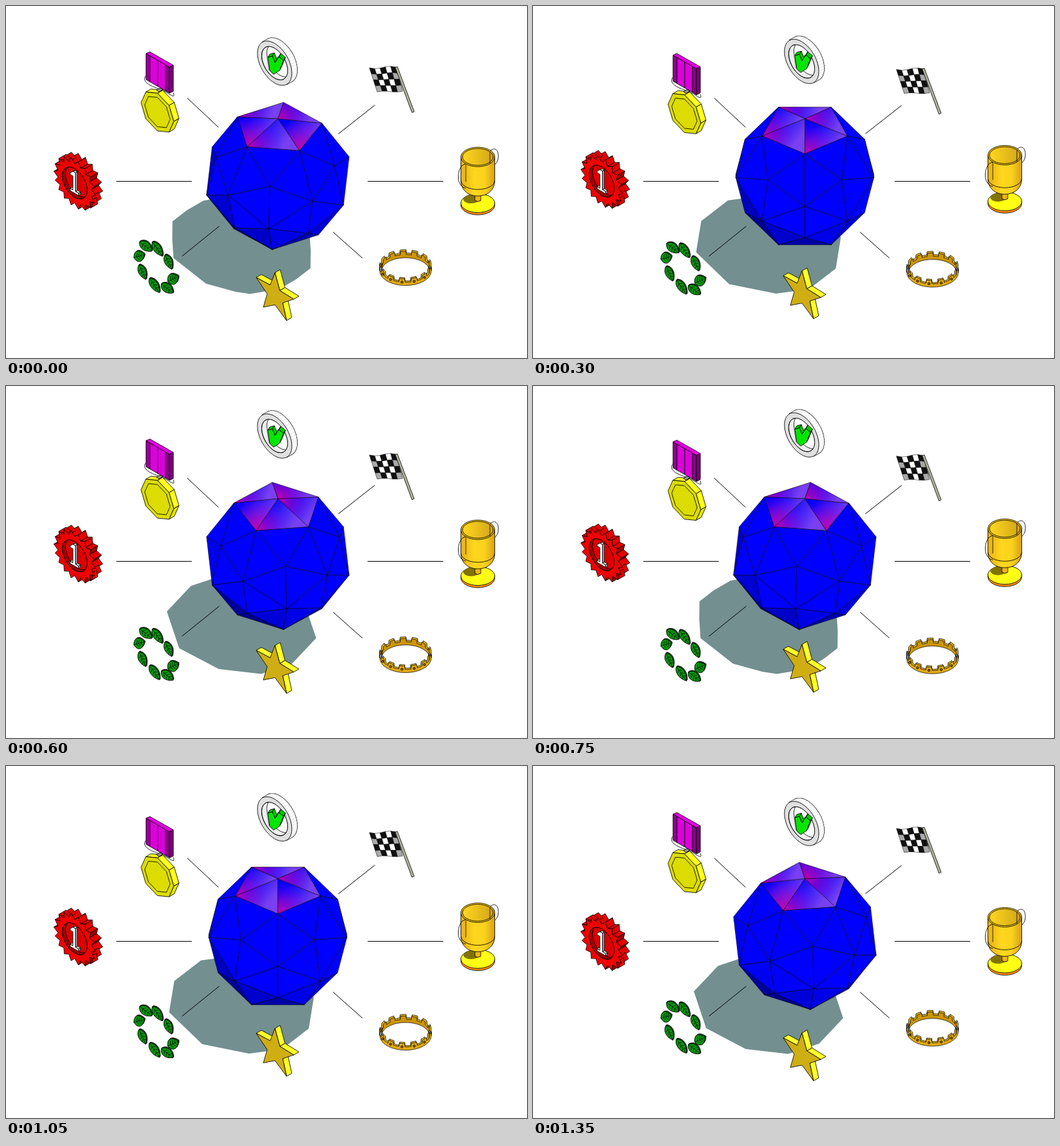
Animation, 800 px wide and 541 px high, one loop 1.5 s. Source, as an HTML page with a canvas:

```html
<!DOCTYPE html>
<html lang="en">
<head>
<meta charset="utf-8">
<title>Awards around a gem</title>
<style>
  html, body { margin: 0; width: 100%; height: 100%; overflow: hidden; background: #fff; }
  canvas, svg { position: absolute; left: 0; top: 0; width: 800px; height: 541px; }
  svg { stroke: #000; stroke-width: .85; stroke-linejoin: round; fill: none; }
</style>
</head>
<body>
<canvas id="gem" width="800" height="541"></canvas>
<svg id="icons" viewBox="0 0 800 541"></svg>
<script>
const STEP = 150, STEPS = 10;
const RISE = [0, -.6, -2.7, -6.8, -11, -12.7, -11, -6.5, -1.6, .5];
const SINK = [0, .6, 2.5, 6.9, 11, 12.7, 11, 7.2, 2.4, 1];
const rad = deg => deg * Math.PI / 180;
const range = n => Array.from({ length: n }, (_, i) => i);

// ---- Gem: a pentakis dodecahedron seen isometrically ----
const R = 113.5, CX = 417.4, CY = 261.2;
const SIN = Math.sqrt(1 / 3), COS = Math.sqrt(2 / 3);
const SUN = [.194, .557, .808], VIEW = [0, COS, SIN];
const SLANT = [-.24, -.69];   // shadow shift per unit of height
const ctx = document.getElementById('gem').getContext('2d');

const dot = (a, b) => a[0] * b[0] + a[1] * b[1] + a[2] * b[2];
const sub = (a, b) => a.map((v, i) => v - b[i]);
const cross = (a, b) => [
  a[1] * b[2] - a[2] * b[1], a[2] * b[0] - a[0] * b[2], a[0] * b[1] - a[1] * b[0]
];
const unit = a => a.map(v => v / Math.hypot(...a));
const circle = (r, z, start) => range(5).map(k => {
  const a = rad(start + 72 * k);
  return [r * Math.sin(a), r * Math.cos(a), z];
});

const corners = [
  ...circle(.607 * R, .795 * R, 0), ...circle(.982 * R, .1876 * R, 0),
  ...circle(.982 * R, -.1876 * R, 36), ...circle(.607 * R, -.795 * R, 36)
];
const P = .95 * R, PR = P * .8944, PZ = P * .4472;
const peaks = [[0, 0, P], ...circle(PR, PZ, 36), ...circle(PR, -PZ, 0), [0, 0, -P]];
const gap = (a, b) => Math.hypot(...sub(a, b));

const faces = [];
peaks.forEach((peak, i) => {
  const rim = [...corners].sort((a, b) => gap(a, peak) - gap(b, peak)).slice(0, 5);
  rim.forEach((a, j) => rim.slice(j + 1).forEach(b => {
    if (gap(a, b) > .75 * R) return;
    const n = cross(sub(a, peak), sub(b, peak));
    faces.push({ top: i === 0, pts: dot(n, peak) > 0 ? [peak, a, b] : [peak, b, a] });
  }));
});

function turn([x, f, z], a) {
  const c = Math.cos(a), s = Math.sin(a);
  return [x * c + f * s, f * c - x * s, z];
}
const project = ([x, f, z]) => [CX + x, CY + f * SIN - z * COS];
const cast = ([x, f, z]) => [361.6 + x + SLANT[0] * z, 367 + (f + SLANT[1] * z) * SIN];

function trace(pts) {
  pts.forEach((p, i) => i ? ctx.lineTo(...p) : ctx.moveTo(...p));
  ctx.closePath();
}

function paintTop(pts) {
  const xs = pts.map(p => p[0]), ys = pts.map(p => p[1]);
  const sheen = ctx.createLinearGradient(
    Math.min(...xs), Math.min(...ys), Math.max(...xs), Math.max(...ys));
  sheen.addColorStop(.2, '#0000ff');
  sheen.addColorStop(.75, '#7840f0');
  ctx.fillStyle = sheen;
  ctx.fill();
  const [x, y] = pts.reduce((a, b) => a[0] - a[1] <= b[0] - b[1] ? a : b);
  const glow = ctx.createRadialGradient(x, y, 0, x, y, 50);
  glow.addColorStop(0, 'rgba(200,0,165,1)');
  glow.addColorStop(1, 'rgba(150,0,220,0)');
  ctx.fillStyle = glow;
  ctx.fill();
}

function drawGem(angle) {
  ctx.clearRect(0, 0, 800, 541);
  const turned = faces.map(({ top, pts }) => {
    const p = pts.map(v => turn(v, angle));
    return { top, p, n: unit(cross(sub(p[1], p[0]), sub(p[2], p[0]))) };
  });

  ctx.beginPath();
  turned.filter(t => dot(t.n, SUN) > 0).forEach(t => trace(t.p.map(cast)));
  ctx.fillStyle = '#738f8f';
  ctx.fill();

  // Shared edges are stroked from both sides, so each stroke stays thin.
  ctx.strokeStyle = '#000';
  ctx.lineWidth = .55;
  ctx.lineJoin = 'round';
  for (const { top, p, n } of turned) {
    if (dot(n, VIEW) <= 0) continue;
    const flat = p.map(project);
    ctx.beginPath();
    trace(flat);
    if (top) {
      paintTop(flat);
    } else {
      const light = Math.max(.55, Math.min(1, .82 + .95 * dot(n, SUN)));
      ctx.fillStyle = `rgb(0,0,${Math.round(255 * light)})`;
      ctx.fill();
    }
    ctx.stroke();
  }
}

// ---- Icon helpers ----
const DEPTH = [8, -4.6];
const list = pts => pts.map(p => p.map(v => v.toFixed(1)).join()).join(' ');
const poly = (pts, fill, more = '') => `<polygon points="${list(pts)}" fill="${fill}" ${more}/>`;
const path = (d, fill = 'none', more = '') => `<path d="${d}" fill="${fill}" ${more}/>`;
const oval = (x, y, rx, ry, fill = 'none', more = '') =>
  `<ellipse cx="${x}" cy="${y}" rx="${rx}" ry="${ry}" fill="${fill}" ${more}/>`;
const shift = (pts, [x, y]) => pts.map(p => [p[0] + x, p[1] + y]);
const iso = (cx, cy, pts) => pts.map(([x, y]) => [cx + x * .866, cy + y + x * .5]);
const wheel = (n, radius, start = 0) => range(n).map(k => {
  const a = rad(start + 360 * k / n), r = radius(k);
  return [r * Math.cos(a), r * Math.sin(a)];
});

// Extrudes a clockwise outline and returns its sides followed by its front.
function prism(pts, front, lit, dark, depth = DEPTH, smooth = false) {
  const sides = pts.map((a, i) => {
    const b = pts[(i + 1) % pts.length];
    return { a, b, nx: b[1] - a[1], ny: a[0] - b[0],
      far: (a[0] + b[0]) * depth[0] + (a[1] + b[1]) * depth[1] };
  }).filter(s => s.nx * depth[0] + s.ny * depth[1] > 0).sort((s, t) => t.far - s.far);
  const quads = more => sides.map(({ a, b, ny }) =>
    poly([a, b, ...shift([b, a], depth)], ny < 0 ? lit : dark, more)).join('');
  return (smooth ? quads('stroke-width="1.7"') + quads(`stroke="${lit}" stroke-width=".4"`) : quads(''))
    + poly(pts, front);
}

let clips = 0;
function hollow(cx, cy, r, depth, wall, floor) {
  const rim = iso(cx, cy, wheel(40, () => r)), id = 'hole' + clips++;
  return `<clipPath id="${id}">${poly(rim, '#000')}</clipPath>` + poly(rim, wall)
    + `<g clip-path="url(#${id})">${poly(shift(rim, depth), floor)}</g>` + poly(rim, 'none');
}

// ---- Icons ----
function tick() {
  const v = [[402, 79], [409, 77], [413, 87], [419, 78], [426, 84], [420, 99], [411, 105], [405, 99]];
  return prism(iso(412.5, 87.9, wheel(48, () => 30.5)), '#e0e0e0', '#fff', '#fff', DEPTH, true)
    + hollow(412.5, 87.9, 23, DEPTH, '#f0f0f0', '#fff')
    + poly(shift(v, [-2, -1]), '#a0a0a0', 'stroke="none"')
    + prism(v, '#00e600', '#00c800', '#009600', [3, -5]);
}

function medal() {
  const slab = (x0, x1, fill) => {
    const y = x => 73 + (x - 215) * .58;
    return poly([[x0, y(x0)], [x1, y(x1)], [x1, y(x1) + 40], [x0, y(x0) + 40]], fill);
  };
  return path('M216 106C208 113 215 121 234 127C250 132 261 146 257 133')
    + slab(215, 221, '#960096') + slab(221, 233, '#dc00dc') + slab(233, 245, '#dc00dc')
    + slab(245, 251, '#8c008c')
    + poly([[215, 73], [221, 70.5], [257, 91], [251, 94]], '#e600e6')
    + poly([[251, 94], [257, 91], [257, 131], [251, 134]], '#780078')
    + prism(iso(232.5, 163, wheel(8, () => 29)), '#dcdc00', '#ffff1e', '#e6e600')
    + poly(iso(232.5, 163, wheel(8, () => 22.5)), 'none')
    + poly([[231, 129], [237, 126], [241, 128], [235, 132]], '#999');
}

function badge() {
  const one = [[-2.5, -16], [2, -16], [2, 12.5], [7.5, 12.5], [7.5, 16], [-7.5, 16], [-7.5, 12.5],
    [-2.5, 12.5], [-2.5, -9], [-7.5, -9], [-7.5, -11.5]];
  return prism(iso(105.5, 272.5, wheel(36, k => k % 2 ? 30 : 37)), '#f00000', '#e60000', '#a00000', [11, -6.4])
    + hollow(105.5, 272, 22, [5, -3], '#a00000', '#dc0000')
    + prism(iso(105, 271.5, one), '#fff', '#ddd', '#aaa', [3, -1.7]);
}

function star() {
  return prism(iso(413, 444.8, wheel(10, k => k % 2 ? 14.5 : 35, -90)), '#cfae14', '#ffff28', '#8c7800');
}

function leaf([x, y, angle, length, width]) {
  const l = length / 2, w = width * .58;
  const shape = `M${-l} 0C${-l * .6} ${-w} ${l * .3} ${-w} ${l} 0C${l * .3} ${w} ${-l * .6} ${w} ${-l} 0Z`;
  const veins = [-.5, -.1, .3].map(k =>
    `M${k * l} 0L${k * l + 3} ${-w * .5}M${k * l} 0L${k * l + 3} ${w * .5}`).join('');
  const at = (dx, dy) => `transform="translate(${x + dx} ${y + dy}) rotate(${angle})"`;
  return path(shape, '#005a00', at(.7, -.7))
    + path(shape, '#0a960f', at(-.5, .5))
    + path(`M${-l} 0H${l}` + veins, 'none', at(-.5, .5) + ' stroke-width=".6"');
}
const wreath = () => [
  [215, 369, 38, 24, 15], [233, 373, 55, 27, 13], [250, 393, 65, 25, 13], [257, 419, -25, 18, 19],
  [248, 433.5, 38, 23, 15], [228.5, 429, 55, 27, 13], [210, 408.5, 65, 25, 13], [205, 384, -15, 17, 19]
].map(leaf).join('');

function flag() {
  const at = (u, v) => [558 + 41 * u + (12 - 2 * u) * v,
    95 + 37 * v - u + 1.6 * Math.sin(2 * Math.PI * u) * (1 - 1.6 * v)];
  let cells = '';
  for (let r = 0; r < 4; r++) for (let c = 0; c < 5; c++) {
    const light = c === 0 || c === 4 ? '#aaa' : '#fff';
    cells += poly([at(c / 5, r / 4), at((c + 1) / 5, r / 4), at((c + 1) / 5, (r + 1) / 4), at(c / 5, (r + 1) / 4)],
      (r + c) % 2 ? light : '#111', 'stroke-width=".5"');
  }
  return cells + poly([[597.5, 94.3], [601, 93.3], [626.8, 162.3], [623.3, 163.8]], '#b4b4a0', 'stroke-width=".8"');
}

function trophy() {
  const x = 724.5;
  return `<linearGradient id="gold"><stop stop-color="#e6af14"/><stop offset=".4" stop-color="#ffd71e"/>
    <stop offset=".7" stop-color="#fad21e"/><stop offset="1" stop-color="#d7a014"/></linearGradient>
    <linearGradient id="inside"><stop stop-color="#ffd71e"/><stop offset="1" stop-color="#d2a519"/></linearGradient>`
    + path('M698.5 302V306A26 15 0 0 0 750.5 306V302Z', '#ff8c0a')
    + oval(x, 303, 26, 14.5, '#ffff14')
    + path('M702 297C706 290 716 289 724 290V301C716 305 704 304 702 297Z', '#827300', 'stroke="none"')
    + path('M720 288V299Q724.5 302 729 299V288Z', '#f0b414')
    + path('M743 223C749 217 756 219 756 231C756 241 750 245 743 249')
    + path('M698.5 232V268C698.5 284 711 292 724.5 292S750.5 284 750.5 268V232Z', 'url(#gold)')
    + oval(x, 232, 26, 15, 'url(#gold)')
    + oval(x, 232, 23.5, 13, 'url(#inside)')
    + path('M698.5 268A26 14 0 0 0 750.5 268')
    + path('M706 244V270M743 224V242', 'none', 'stroke-width=".8"')
    + path('M706 243C698 243 694.5 254 694.5 263C694.5 273 700 279 706 280');
}

function crown() {
  const cx = 613.5, cy = 407, teeth = 13;
  const wall = (from, to, rx, ry, fill) => {
    const at = (deg, h) => [cx + rx * Math.cos(rad(deg)), cy + ry * Math.sin(rad(deg)) - h];
    const top = [], base = [];
    for (let d = from; d <= to; d += 1) {
      const phase = ((d - 8) * teeth / 360 % 1 + 1) % 1;
      top.push(at(d, phase < .5 ? 10 : 5));
      base.unshift(at(d, 0));
    }
    return poly([...top, ...base], fill, 'stroke-width=".8"');
  };
  const studs = range(5).map(k => {
    const a = rad(8 + (k + 1.25) * 360 / teeth);
    return oval((cx + 39.5 * Math.cos(a)).toFixed(1), (cy + 22.5 * Math.sin(a) - 5).toFixed(1), 1.7, 1.7, '#a06e00');
  }).join('');
  return wall(180, 360, 39.5, 22.5, '#e6b41e') + wall(180, 360, 36.5, 20, '#cd960a')
    + wall(0, 180, 36.5, 20.5, '#e6b41e') + wall(0, 180, 39.5, 22.5, '#e1aa14') + studs;
}

const group = (name, ...parts) => `<g id="${name}">${parts.map(draw => draw()).join('')}</g>`;
document.getElementById('icons').innerHTML =
  path('M278 141L326 186M566 152L510 196M169 269H285M555 269H671M327 338L270 384M502 347L547 387',
    'none', 'transform="translate(.3 .5)" stroke-width="1"')
  + group('rise', tick, badge, star, trophy)
  + group('sink', medal, flag, wreath, crown);
const rise = document.getElementById('rise'), sink = document.getElementById('sink');

let shown = -1;
function tickClock() {
  const step = Math.floor(performance.now() / STEP) % STEPS;
  if (step !== shown) {
    shown = step;
    drawGem(rad(28.8 - 14.4 * step));
    rise.setAttribute('transform', `translate(0 ${RISE[step]})`);
    sink.setAttribute('transform', `translate(0 ${SINK[step]})`);
  }
  requestAnimationFrame(tickClock);
}
tickClock();
</script>
</body>
</html>
```
